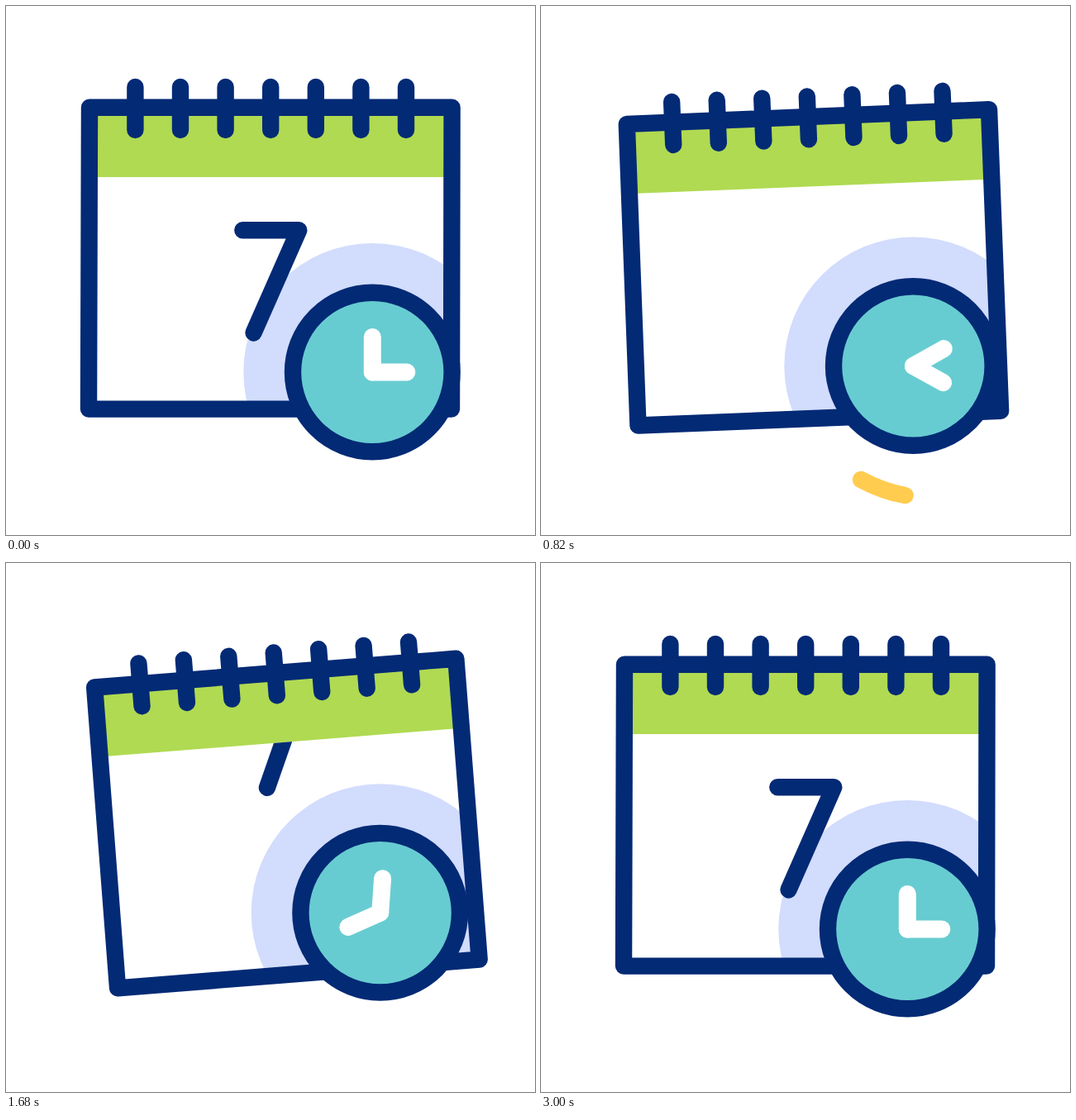
Write an HTML page that moves like this. It is 640 by 640 pixels and loops after 3.24 s.

```html
<!DOCTYPE html>
<html lang="en">
<head>
<meta charset="utf-8">
<title>Calendar and clock</title>
<style>
  html, body { margin: 0; width: 100%; height: 100%; overflow: hidden; background: #fff; }
  svg { display: block; width: 100vw; height: 100vh; }
  .line { fill: none; stroke: #032a75; stroke-width: 20.4; stroke-linecap: round; stroke-linejoin: round; }
  .hand { stroke: #fff; stroke-width: 21; stroke-linecap: round; }
  .sweep { fill: none; stroke: #ffcc4f; stroke-width: 20.5; stroke-linecap: round; }
</style>
</head>
<body>
<svg viewBox="0 0 640 640">
  <defs>
    <clipPath id="page"><path id="pageBox" d="M101 122.7H539.6L539 487.6H100Z"/></clipPath>
    <clipPath id="below"><rect x="100" y="207" width="440" height="281"/></clipPath>
  </defs>
  <g clip-path="url(#page)"><circle id="halo" r="156" fill="#d2dcfd"/></g>
  <g id="calendar">
    <rect x="110" y="130" width="420" height="77" fill="#b0da52"/>
    <g clip-path="url(#below)">
      <path id="seven" class="line" d="M286.3 271.2H354.3L299.5 395.4"/>
    </g>
    <path class="line" d="M101 122.7H539.6L539 487.6H100Z"/>
    <path id="rings" class="line"/>
  </g>
  <path id="sweep" class="sweep" pathLength="100" d="M387 573C430 596 465 597 493 590C550 578 595 537 595 479"/>
  <g id="clock">
    <circle class="line" r="96.3" style="fill:#67ccd1"/>
    <path id="minute" class="hand" d="M0 0V-42.5"/>
    <path id="hour" class="hand" d="M0 0V-41.5"/>
  </g>
</svg>
<script>
const LOOP = 3240;
const $ = id => document.getElementById(id);
const move = (id, value) => $(id).setAttribute('transform', value);

const progress = (t, from, to) => Math.min(1, Math.max(0, (t - from) / (to - from)));
const ease = (t, from, to) => (1 - Math.cos(Math.PI * progress(t, from, to))) / 2;

// Eased swings between a few [time, value] turning points.
const swing = (...turns) => t => turns.slice(1).reduce(
  (sum, [time, value], i) => sum + (value - turns[i][1]) * ease(t, turns[i][0], time),
  turns[0][1]);

const tilt = swing([265, 0], [560, 5], [960, -5], [1310, 5], [1740, -5], [2130, 0]);
const bob = swing([180, 0], [340, -6.3], [820, 3], [1240, -6], [1680, -6], [2320, 0]);
const clockX = swing([340, 0], [690, 10], [1190, -8.6], [1660, 9.5], [2040, -2.5], [2400, 0]);
const clockY = swing([180, 0], [340, -20.5], [820, -7.5], [1240, -22], [1580, -22], [2080, 0]);

// The digit leaves upwards, then drops back in and settles.
const slide = t => t < 1200
  ? -215 * ease(t, 320, 740)
  : -215 * (1 - progress(t, 1535, 2555)) ** 3;

function drawSweep(t) {
  const head = 100 * ease(t, 640, 1240);
  const tail = 100 * ease(t, 940, 1620);
  const line = $('sweep').style;
  line.display = head - tail > 0.1 ? '' : 'none';
  line.strokeDasharray = `${head - tail} 300`;
  line.strokeDashoffset = -tail;
}

function draw(t) {
  const page = `translate(0 ${bob(t)}) rotate(${tilt(t)} 530 62)`;
  const spot = `translate(${443.3 + clockX(t)} ${443 + clockY(t)})`;
  move('calendar', page);
  move('pageBox', page);
  move('seven', `translate(0 ${slide(t)})`);
  move('halo', spot);
  move('clock', spot);
  move('minute', `rotate(${360 * progress(t, 540, 2210)})`);
  move('hour', `rotate(${90 + 360 * ease(t, 500, 2250)})`);
  drawSweep(t);
}

$('rings').setAttribute('d',
  Array.from({ length: 7 }, (_, i) => `M${156.4 + i * 54.6} 98V150`).join(''));

const start = performance.now();
function tick() {
  draw((performance.now() - start) % LOOP);
  requestAnimationFrame(tick);
}
tick();
</script>
</body>
</html>
```
